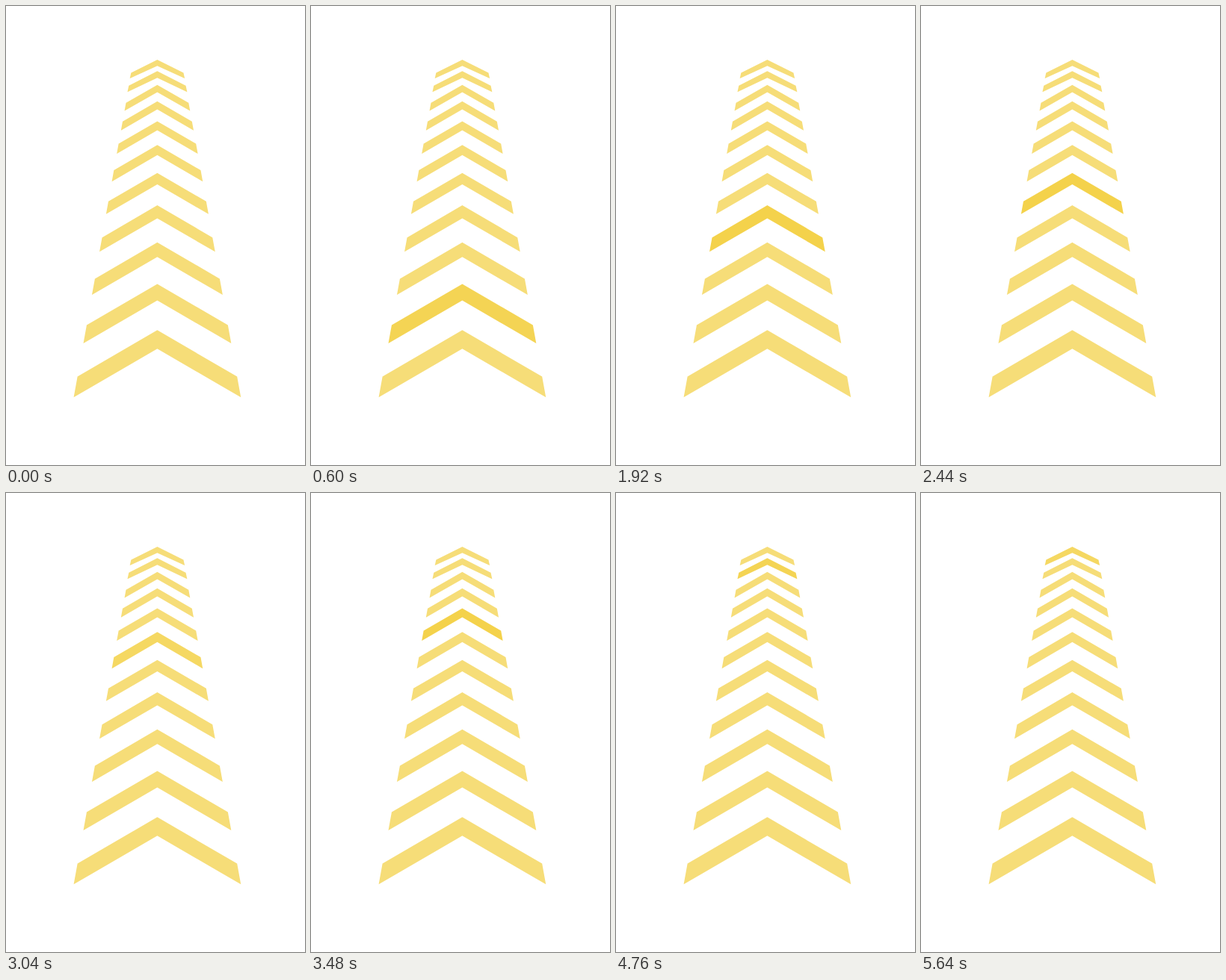
These frames come from a looping animation (400 by 615 pixels, 5.72 s). An HTML page:

```html
<!DOCTYPE html>
<html lang="en">
<head>
<meta charset="utf-8">
<title>Chevron path</title>
<style>
html, body { margin: 0; width: 100%; height: 100%; overflow: hidden; background: #fff; }
svg { display: block; width: 400px; height: 615px; }
polygon { fill: #f6dd78; animation: pulse 5720ms infinite; }
/* Each pulse takes one eleventh of the loop: 200 ms up, 320 ms down. */
@keyframes pulse {
  0% { fill: #f6dd78; animation-timing-function: steps(5); }
  3.4965% { fill: #f2c61e; animation-timing-function: steps(4); }
  6.2937% { fill: #f4d24b; animation-timing-function: steps(2); }
  9.0909%, 100% { fill: #f6dd78; }
}
</style>
</head>
<body>
<svg id="stage" viewBox="0 0 400 615"></svg>
<script>
const COUNT = 11, LOOP = 5720, PULSE = LOOP / COUNT, CENTER = 202.4;

const poly = (x, ...terms) => terms.reduceRight((sum, c) => sum * x + c, 0);

// Outline of the chevron that lies n places before the farthest one.
function outline(n) {
  const apex = poly(n, 72, 14.25, 0.938, 0.186, -0.006);
  const half = poly(n, 36.7, 2.91, 0.305, 0.0155);
  const tilt = 1 - 0.15 * Math.exp(-((n / 1.6) ** 4)); // flatter near the horizon
  const at = (across, down) => [CENTER + across * half, apex + down * half];
  const shoulder = 0.557 * tilt, foot = 0.805 * tilt;
  return [
    at(0, 0), at(0.955, shoulder), at(1, foot),
    at(0, 0.224), at(-1, foot), at(-0.955, shoulder)
  ];
}

const stage = document.getElementById("stage");
for (let i = 0; i < COUNT; i++) {
  const shape = document.createElementNS("http://www.w3.org/2000/svg", "polygon");
  shape.setAttribute("points", outline(COUNT - 1 - i).join(" "));
  shape.style.animationDelay = `${i * PULSE - LOOP - 2}ms`;
  stage.append(shape);
}
</script>
</body>
</html>
```
